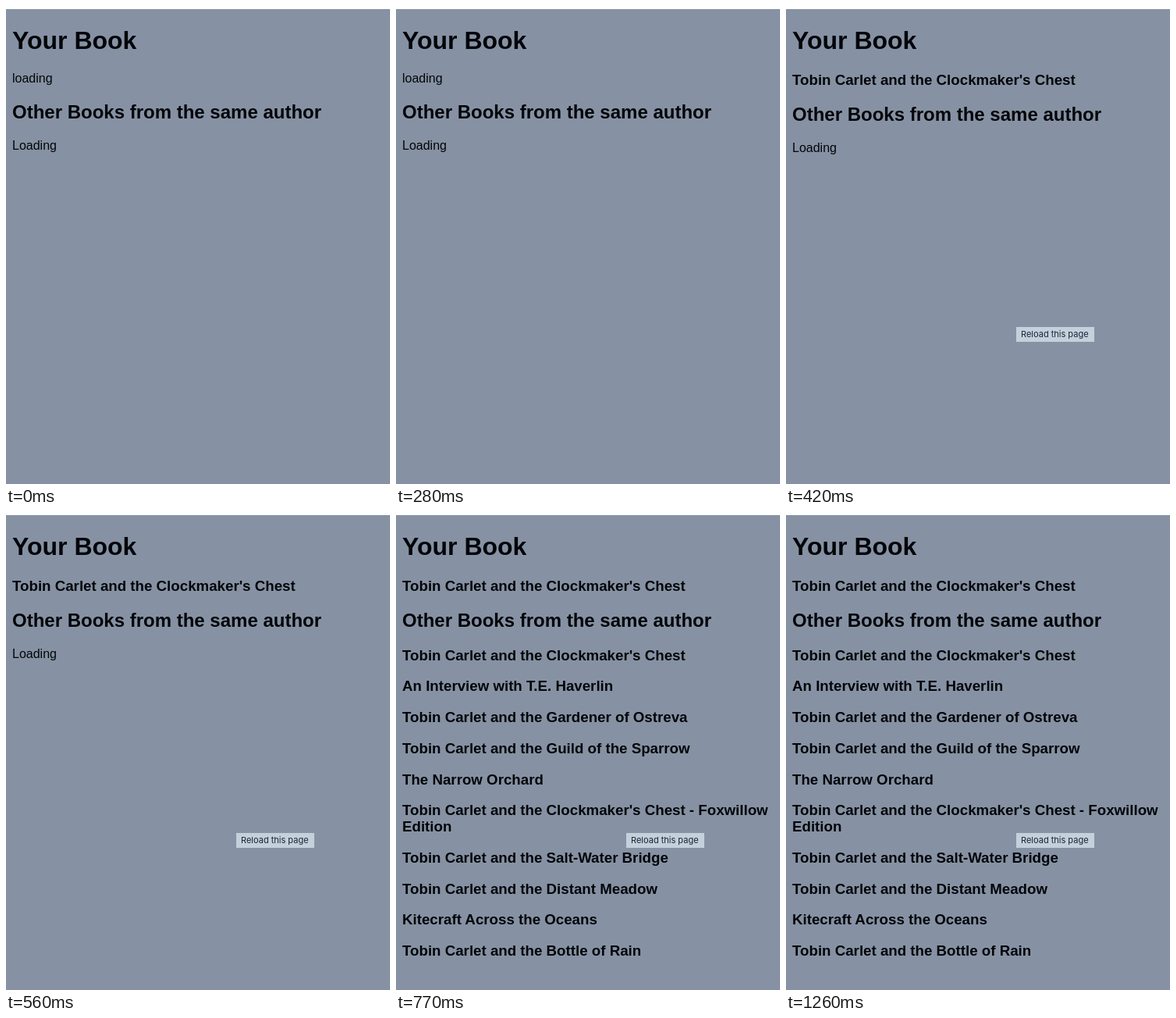
Animation, 492 px wide and 612 px high, one loop 1.33 s. Source, as an HTML page:

```html
<!DOCTYPE html>
<html lang="en">
<head>
<meta charset="utf-8">
<title>Your Book</title>
<style>
  html, body { margin: 0; width: 100%; height: 100%; overflow: hidden; background: #8692a3; }
  svg { display: block; }
  text { font: 16px "Liberation Sans", Arial, sans-serif; fill: #03050a; }
  .h1 { font-size: 32px; font-weight: bold; }
  .h2 { font-size: 24px; font-weight: bold; }
  .h3 { font-size: 18.72px; font-weight: bold; }
  .tip { font: 11px Inter, sans-serif; fill: #1c2433; }
</style>
</head>
<body>
<svg width="492" height="612" viewBox="0 0 492 612">
  <rect width="492" height="4" fill="#fff"/>
  <g id="page"></g>
  <g id="tooltip">
    <rect x="295" y="411" width="100" height="19" fill="#c5d0dd"/>
    <text class="tip" x="301" y="424">Reload this page</text>
  </g>
</svg>
<script>
const LOOP = 1330, TIP_AT = 350, BOOK_AT = 420, LIST_AT = 770;
const hero = "Tobin Carlet and the ";
const book = hero + "Clockmaker's Chest";
const others = [
  book,
  "An Interview with T.E. Haverlin",
  hero + "Gardener of Ostreva",
  hero + "Guild of the Sparrow",
  "The Narrow Orchard",
  book + " - Foxwillow\nEdition",
  hero + "Salt-Water Bridge",
  hero + "Distant Meadow",
  "Kitecraft Across the Oceans",
  hero + "Bottle of Rain"
];
const page = document.getElementById("page");
const tooltip = document.getElementById("tooltip");

const line = (kind, y, words) =>
  `<text class="${kind}" x="8" y="${Math.round(y)}">${words}</text>`;

function bookList() {
  let y = 189.7, out = "";
  for (const title of others) {
    title.split("\n").forEach((part, i) => {
      if (i) y += 21;
      out += line("h3", y, part);
    });
    y += 39.72;
  }
  return out;
}

function render(hasBook, hasList) {
  const shift = hasBook ? 3 : 0;
  page.innerHTML = line("h1", 55, "Your Book") +
    (hasBook ? line("h3", 101, book) : line("p", 98, "loading")) +
    line("h2", 144 + shift, "Other Books from the same author") +
    (hasList ? bookList() : line("p", 184 + shift, "Loading"));
}

let shown;
function tick() {
  const t = performance.now() % LOOP;
  const state = (t >= BOOK_AT) + (t >= LIST_AT);
  if (state !== shown) render(state > 0, state > 1);
  shown = state;
  tooltip.style.display = t >= TIP_AT ? "" : "none";
  requestAnimationFrame(tick);
}
tick();
</script>
</body>
</html>
```
